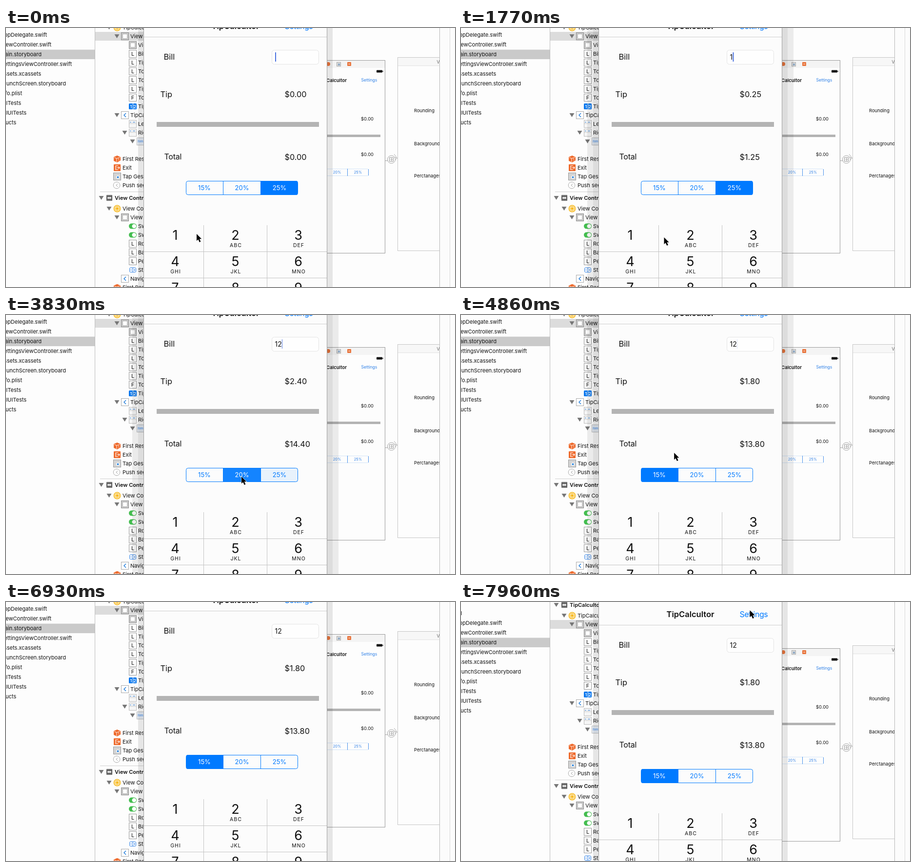
Recreate the animation shown at these times as an HTML page. Size 921 by 532 pixels, loop 8 s.

```html
<!DOCTYPE html>
<html lang="en">
<head>
<meta charset="utf-8">
<title>Tip calculator</title>
<style>
html, body { margin: 0; width: 921px; height: 532px; overflow: hidden; background: #fdfdfd; }
svg { display: block; }
text { font-family: Inter, Roboto, "Liberation Sans", sans-serif; fill: #111; white-space: pre; }
</style>
</head>
<body>
<svg id="stage" width="921" height="532" viewBox="0 0 921 532"></svg>
<script>
const BLUE = '#007aff', LINK = '#2c7fe6';

// Drawing helpers, each returning markup
const rect = (x, y, w, h, fill, extra = '') =>
  `<rect x="${x}" y="${y}" width="${w}" height="${h}" fill="${fill}" ${extra}/>`;
const path = (d, stroke, extra = '') =>
  `<path d="${d}" stroke="${stroke}" fill="none" ${extra}/>`;
const text = (x, y, size, str, extra = '') =>
  `<text x="${x}" y="${y}" font-size="${size}" ${extra}>${str}</text>`;
const END = 'text-anchor="end"', MID = 'text-anchor="middle"', BOLD = 'font-weight="600"';

// Small icons of the outline, centred on x, y
const icons = {
  scene: (x, y) => rect(x - 6, y - 6, 12, 12, '#555', 'rx="1"') +
    rect(x - 4, y - 2, 8, 4, '#ddd') +
    path(`M${x - 5} ${y - 4.5}h10M${x - 5} ${y + 4.5}h10`, '#ddd', 'stroke-dasharray="1.5 1.5"'),
  controller: (x, y) => `<circle cx="${x}" cy="${y}" r="7.5" fill="#f7b81c"/>` +
    `<circle cx="${x}" cy="${y}" r="5.6" fill="none" stroke="#fff" stroke-width=".8"/>` +
    rect(x - 3, y - 3, 6, 6, 'none', 'stroke="#fff"'),
  view: (x, y) => rect(x - 7.5, y - 7.5, 15, 15, '#c9c9c9', 'stroke="#8c8c8c"') +
    rect(x - 4.5, y - 4.5, 9, 9, '#fff', 'stroke="#aaa" stroke-width=".7"'),
  L: (x, y) => letter(x, y, 'L'),
  F: (x, y) => letter(x, y, 'F'),
  segment: (x, y) => rect(x - 8, y - 6, 16, 12, '#0a78ee', 'rx="1.5"') +
    path(`M${x + .5} ${y - 6}v12`, '#fff') +
    text(x - 3.5, y + 3.5, 9, '1', `${MID} style="fill:#fff" ${BOLD}`) +
    text(x + 4, y + 3.5, 9, '2', `${MID} style="fill:#fff" ${BOLD}`),
  nav: (x, y) => rect(x - 7.5, y - 7.5, 15, 15, '#fff', 'stroke="#aaa"') +
    path(`M${x + 2} ${y - 4}l-4 4l4 4`, '#1a78d8', 'stroke-width="1.4"'),
  bar: (x, y) => rect(x - 7.5, y - 7.5, 15, 15, '#f6f6f6', 'stroke="#bbb"') +
    path(`M${x - 6} ${y - 3.5}h3m3 0h5`, '#6b9fd8', 'stroke-width="1.5"') +
    path(`M${x - 7} ${y - .5}h14`, '#ccc'),
  item: (x, y) => rect(x - 7.5, y - 7.5, 15, 15, '#e6ecf5', 'stroke="#bbb"') +
    text(x, y + 2, 5.5, 'Item', `${MID} style="fill:${LINK}"`),
  cube: (x, y) => `<path d="M${x - 7} ${y - 4}l7 -3l7 3v7l-7 4l-7 -3z" fill="#ee6a2c"/>` +
    path(`M${x - 6} ${y - 3}l5 2v7M${x - 1} ${y - 1}l7 -2.5`, '#fff', 'stroke-width=".9"') +
    text(x + 3, y + 4, 6, '1', `${MID} style="fill:#fff"`),
  exit: (x, y) => rect(x - 7, y - 7, 14, 14, '#ee6a2c', 'rx="1"') +
    path(`M${x + 2} ${y - 4}h-5v8h5M${x - 1} ${y}h6m-2 -2l2 2l-2 2`, '#fff', 'stroke-width="1.2"'),
  tap: (x, y) => rect(x - 7.5, y - 7.5, 15, 15, '#d4d4d4', 'stroke="#999"') +
    `<circle cx="${x + 1.5}" cy="${y + 1.5}" r="3.3" fill="#fff"/>` +
    `<circle cx="${x + 1.5}" cy="${y + 1.5}" r="2" fill="#2c84dc"/>`,
  segue: (x, y) => `<circle cx="${x - 1}" cy="${y}" r="6.8" fill="#fff" stroke="#aaa"/>` +
    path(`M${x + 1} ${y - 3}l-3 3l3 3`, '#999'),
  toggle: (x, y) => rect(x - 8, y - 5.5, 16, 11, '#43bd4f', 'rx="5.5"') +
    `<circle cx="${x + 2.8}" cy="${y}" r="4.3" fill="#fff"/>`,
  stepper: (x, y) => rect(x - 6.5, y - 4.5, 13, 9, '#fff', `rx="2" stroke="${LINK}"`) +
    path(`M${x} ${y - 4}v8M${x - 5} ${y}h3M${x + 2} ${y}h3m-1.5 -1.5v3`, LINK)
};
function letter(x, y, ch) {
  return rect(x - 7.5, y - 7.5, 15, 15, '#fff', 'stroke="#999"') + text(x, y + 4, 11, ch, MID);
}

// Outline rows: y, depth, icon, label, open triangle, bold
const outline = [
  [-23, 0, 'scene', 'TipCalcultor Scene', 1, 1],
  [-1, 1, 'controller', 'TipCalcultor', 1],
  [17, 2, 'view', 'View', 1],
  [35, 3, 'view', 'View'],
  [53, 3, 'L', 'Bill'], [71, 3, 'L', 'Tip'], [89, 3, 'L', 'Total'],
  [107, 3, 'L', 'Total'], [125, 3, 'L', 'Tip'], [143, 3, 'F', 'Total'],
  [161, 3, 'segment', 'Tip'],
  [179, 2, 'nav', 'TipCalcultor', 1],
  [197, 3, 'bar', 'Left Bar'], [215, 3, 'bar', 'Right Bar', 1],
  [233, 4, 'item', '', 1],
  [269, 1, 'cube', 'First Responder'], [287, 1, 'exit', 'Exit'],
  [305, 1, 'tap', 'Tap Gesture'], [323, 1, 'segue', 'Push segue'],
  [349, 0, 'scene', 'View Controller', 1, 1],
  [371, 1, 'controller', 'View Controller', 1],
  [389, 2, 'view', 'View', 1],
  [407, 3, 'toggle', 'Switch'], [425, 3, 'toggle', 'Switch'],
  [443, 3, 'L', 'Rounding'], [461, 3, 'L', 'Background'], [479, 3, 'L', 'Perctanages'],
  [497, 3, 'stepper', 'Stepper'],
  [515, 2, 'nav', 'Navigation'],
  [533, 1, 'cube', 'First Responder']
];

const drawOutline = () => rect(183, 8, 100, 18, '#dcdcdc') +
  path('M193 336.5h90', '#d0d0d0') +
  outline.map(([y, depth, icon, label, open, bold]) => {
    const x = 212 + depth * 16;
    return (open ? `<path d="M${x - 21.5} ${y - 4}h10l-5 8z" fill="#777"/>` : '') +
      icons[icon](x, y) + text(x + 11, y + 4, 11, label, bold ? BOLD : '');
  }).join('');

// File list, aligned on the right end of each name
const files = [['TipCal', 2], ['AppDelegate.swift', 84], ['ViewController.swift', 93],
  ['Main.storyboard', 73], ['SettingsViewController.swift', 135], ['Assets.xcassets', 72],
  ['LaunchScreen.storyboard', 123], ['Info.plist', 33], ['TipCalTests', 31],
  ['TipCalUITests', 42], ['Products', 21]];

const drawFiles = () => rect(0, 44.5, 182, 19.5, '#cacaca') +
  files.map(([name, x], i) => text(x, 20 * i - 2, 11, name, END)).join('') +
  path('M182.5 -60V600', '#bcbcbc');

function drawCanvas() {
  const blue = `style="fill:${LINK}"`;
  return rect(600, 66.5, 177.5, 396, '#fdfdfd', 'stroke="#9a9a9a"') +
    rect(600, 67, 177, 15, '#f4f4f4') +
    '<circle cx="661" cy="74" r="4" fill="#e8743c"/>' +
    rect(678.5, 70.5, 8, 8, '#ddd', 'stroke="#aaa"') + rect(681, 73, 4, 4, '#8fa9c4') +
    rect(700, 70, 8, 8, '#e8743c', 'rx="1"') + path('M702 74h4', '#fff') +
    rect(760, 86.5, 12, 5, '#111', 'rx="1"') + rect(772.5, 88, 1.2, 2, '#111') +
    text(699, 110.5, 9.5, 'TipCalcultor', `${END} ${BOLD}`) +
    text(728.5, 110, 8.5, 'Settings', blue) +
    text(728, 189.5, 9.4, '$0.00') + text(728, 262.5, 9.4, '$0.00') +
    rect(640, 219, 128, 5, '#b3b3b3') +
    path('M650 289.5h91.5q2 0 2 2v10q0 2 -2 2h-91.5', '#d4e4f8') +
    path('M700.5 289v15M743.5 290v13', '#4a92ea') +
    text(679, 298.5, 7.5, '20%', `${MID} ${blue}`) + text(722, 298.5, 7.5, '25%', `${MID} ${blue}`) +
    path('M778 272.5h6M792 263l10 4.5l-5 5M796 259l6.5 8.5', '#aaa') +
    '<circle cx="790.5" cy="270" r="8" fill="#fdfdfd" stroke="#a4a4a4"/>' +
    rect(786.5, 266, 8, 8, 'none', 'stroke="#999"') +
    path('M788 270h5m-2 -2l2 2l-2 2M790.5 266v8', '#aaa', 'stroke-width=".8"') +
    rect(803.5, 60.5, 100, 397, '#fdfdfd', 'stroke="#c6c6c6"') +
    rect(804, 61, 90, 16, '#f7f7f7') + path('M804 77.5h86', '#e2e2e2') +
    text(883.5, 72.5, 9, 'View', 'style="fill:#666"') +
    text(837, 172.5, 9.4, 'Rounding') + text(837, 240.5, 9.4, 'Background') +
    text(837, 306.5, 9.4, 'Perctanages') +
    rect(889, -60, 32, 660, '#fcfcfc') +
    path('M889.5 -60V600', '#b8b8b8') + path('M910.5 -60V600', '#d8d8d8');
}

const shade = (near, alpha) => rect(283 - near, -60, 12, 660, '#000', `opacity="${alpha}"`) +
  rect(658 + near - 12, -60, 12, 660, '#000', `opacity="${alpha}"`);

const columns = [347, 470.5, 599.5];
const hints = ['', 'ABC', 'DEF', 'GHI', 'JKL', 'MNO', 'PQRS', 'TUV', 'WXYZ'];
const drawKeys = () => hints.map((hint, i) => {
  const x = columns[i % 3], y = 435 + 54 * Math.floor(i / 3);
  return text(x, y, 27, i + 1, MID) +
    text(x + 1, y + 15, 10.5, hint, `${MID} letter-spacing="1"`);
}).join('') + path('M405.5 405V600M535.5 405V600M283 459.5h375M283 513.5h375', '#c4c4c4');

const segments = [[369.5, 76], [445.5, 77], [522.5, 76]];
const drawSegments = () => `<clipPath id="pill">${rect(369, 314, 230, 29, '#fff', 'rx="4"')}</clipPath>` +
  `<g clip-path="url(#pill)">${segments.map(([x, w], i) =>
    rect(x, 314, w, 29, BLUE, `id="seg${i}"`)).join('')}</g>` +
  rect(369.5, 314.5, 229, 28, 'none', `rx="4" stroke="${BLUE}"`) +
  path('M445.5 314v29M522.5 314v29', BLUE) +
  [407, 484, 561].map((x, i) => text(x, 333, 13, 15 + 5 * i + '%', `${MID} id="pct${i}"`)).join('');

const drawPhone = () => rect(283, -60, 375, 660, '#fcfcfc') +
  path('M282.5 -60V600M658.5 -60V600', '#a0a0a0') +
  text(470.5, 2, 16.5, 'TipCalcultor', `${MID} ${BOLD}`) +
  text(571.5, 2, 16, 'Settings', `letter-spacing="-.5" style="fill:${BLUE}"`) +
  path('M283 18.5h375', '#cfcfcf') +
  text(323.5, 64.5, 16.5, 'Bill') + text(316.5, 141.5, 16.3, 'Tip') +
  text(324.5, 269.5, 16, 'Total', 'letter-spacing="-.25"') +
  rect(545.5, 45.5, 96, 29, '#fefefe', 'rx="5" stroke="#e4e4e4"') +
  text(551.5, 64.5, 14, '', 'id="bill"') +
  rect(552, 50, 2, 19, '#4a72e0', 'id="caret"') +
  text(571.5, 141.5, 16.3, '', 'id="tip"') + text(571.5, 270.5, 16.3, '', 'id="total"') +
  rect(309, 193, 333, 10, '#b4b4b4') +
  drawSegments() +
  rect(283, 405, 122, 54, '#d3d6db', 'id="key1"') + rect(406, 405, 129, 54, '#d3d6db', 'id="key2"') +
  drawKeys();

document.getElementById('stage').innerHTML =
  `<g id="scene">${drawFiles()}${drawOutline()}${drawCanvas()}` +
  `${shade(12, .09)}<g id="wide">${shade(12, .04)}${shade(24, .07)}</g>${drawPhone()}</g>` +
  '<path id="cursor" d="M0 0V14.2L3.2 11.2L5.8 17L8.4 15.8L5.9 10.2H10.2Z" ' +
  'fill="#000" stroke="#fff" stroke-width="1.1" paint-order="stroke"/>';

const el = id => document.getElementById(id);
const LOOP = 8000, STEP = 147.3;

// Tracks of [step, value...], linear in between
const pointer = [[0, 391, 423], [4, 369, 434], [8, 369, 434], [12, 416.5, 430], [13, 423, 431],
  [17, 426, 432], [24, 483, 332], [26, 483, 332], [28, 462, 345], [30, 408, 339], [32, 408, 338],
  [38, 583, 8], [39, 588, 3], [43, 587, -20], [48, 590, -20], [51, 591, 12], [53, 590, 17], [54, 592.5, 17]];
const scroll = [[0, 0], [47, 0], [48, 4], [49, 11], [50, 18], [52, 27], [53, 29]];

function along(track, k) {
  const i = track.findIndex(p => p[0] > k);
  if (i < 0) return track[track.length - 1].slice(1);
  const a = track[i - 1], b = track[i], f = (k - a[0]) / (b[0] - a[0]);
  return a.slice(1).map((v, n) => v + (b[n + 1] - v) * f);
}

const clamp = v => Math.max(0, Math.min(1, v));
const money = v => '$' + v.toFixed(2);
const show = (id, on) => el(id).setAttribute('opacity', +on);

function caretAlpha(t, typed) {
  const phase = (t / 1000 + (typed ? 0 : .65)) % 1;
  return phase < .5 ? clamp((phase - .1) / .15) : clamp((.87 - phase) / .08);
}

function draw(t) {
  const k = Math.floor(t / STEP);
  const bill = k < 7 ? '' : k < 15 ? '1' : '12';
  const choice = k < 26 ? 2 : k < 32 ? 1 : 0;
  const switching = k === 26 || k === 32;
  const tip = bill * (15 + 5 * choice) / 100;

  el('bill').textContent = bill;
  el('tip').textContent = money(tip);
  el('total').textContent = money(+bill + tip);
  el('caret').setAttribute('x', [552, 557.5, 565.5][bill.length]);
  show('caret', caretAlpha(k * STEP, bill));

  for (let i = 0; i < 3; i++) {
    const on = i === choice;
    show('seg' + i, on ? (switching ? .92 : 1) : switching && i === choice + 1 ? .08 : 0);
    el('pct' + i).style.fill = on ? '#fff' : BLUE;
  }
  show('key1', k === 6);
  show('key2', k === 14);
  show('wide', k >= 7 && k < 46);

  const [x, y] = along(pointer, k), [dy] = along(scroll, k);
  el('cursor').setAttribute('transform', `translate(${x} ${y})`);
  el('scene').setAttribute('transform', `translate(0 ${dy})`);
}

const start = performance.now();
function tick() {
  draw((performance.now() - start) % LOOP);
  requestAnimationFrame(tick);
}
tick();
</script>
</body>
</html>
```
